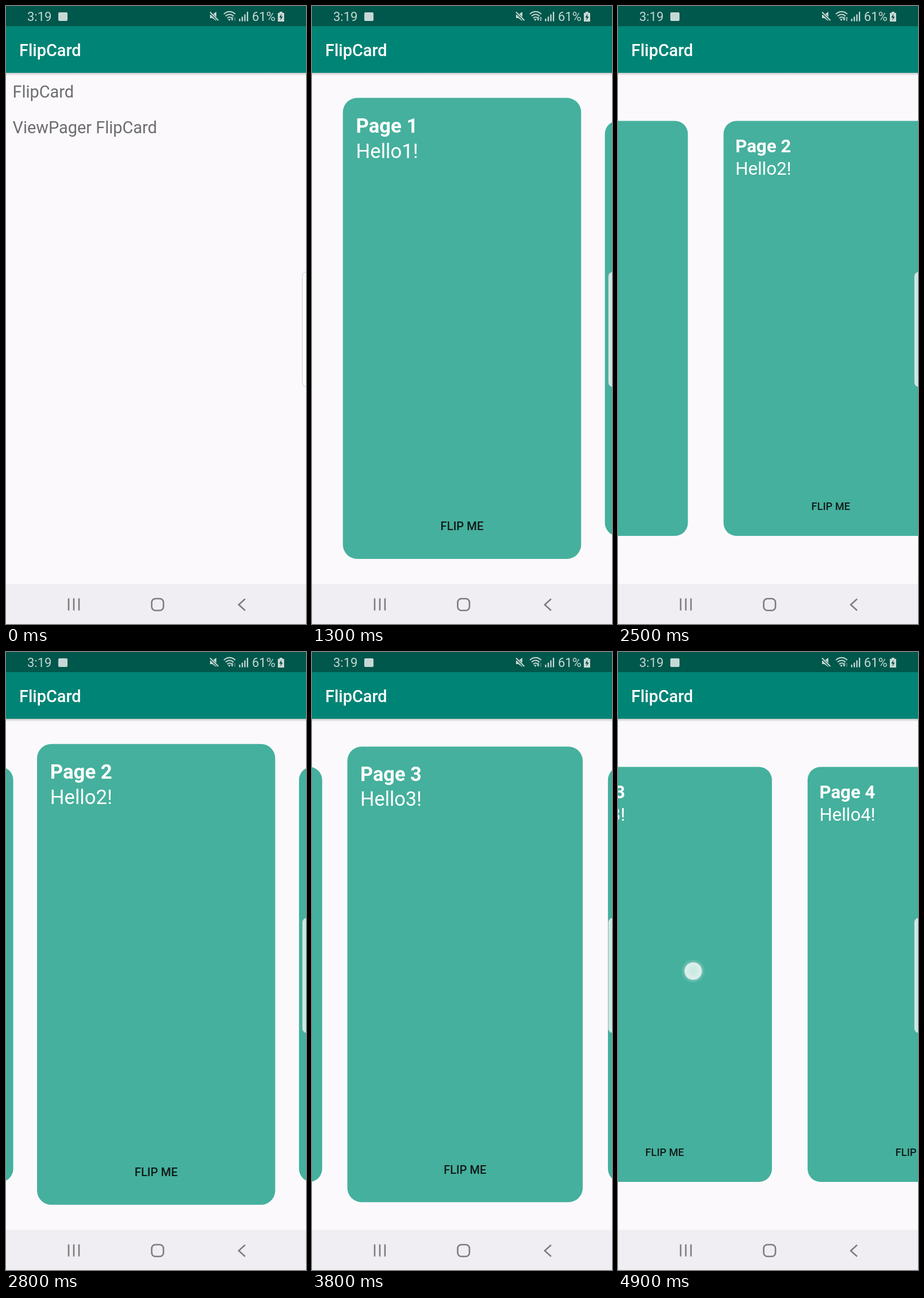
An HTML page for the animation above (5000 ms loop, 522 px wide and 1073 px high).

```html
<!DOCTYPE html>
<html lang="en">
<head>
<meta charset="utf-8">
<title>FlipCard</title>
<style>
  html, body { margin: 0; width: 100%; height: 100%; overflow: hidden; background: #fbf9fc; }
  svg { display: block; width: 100%; height: 100%; }
  text { font-family: Roboto, "Noto Sans", sans-serif; }
  .title { font-size: 28.9px; font-weight: 500; fill: #fff; }
  .item { font-size: 28.9px; fill: #6d6c6e; }
  .page { font-size: 34.7px; font-weight: 700; fill: #fff; }
  .hello { font-size: 34.7px; fill: #fff; }
  .flip { font-size: 20.2px; font-weight: 500; fill: #101a18; text-anchor: middle; }
  .clock { font-size: 22px; fill: #c6d8d5; }
</style>
</head>
<body>
<svg viewBox="0 0 522 1073" preserveAspectRatio="none">
  <defs>
    <linearGradient id="shade" x2="0" y2="1">
      <stop offset="0" stop-color="#000" stop-opacity=".2"/>
      <stop offset="1" stop-color="#000" stop-opacity="0"/>
    </linearGradient>
    <radialGradient id="glow">
      <stop offset=".7" stop-color="#fff" stop-opacity=".28"/>
      <stop offset="1" stop-color="#fff" stop-opacity="0"/>
    </radialGradient>
    <radialGradient id="dot">
      <stop offset="0" stop-color="#fff" stop-opacity=".58"/>
      <stop offset="1" stop-color="#fff" stop-opacity=".76"/>
    </radialGradient>
    <g id="bars">
      <rect y="116" width="522" height="5" fill="url(#shade)"/>
      <rect width="522" height="36" fill="#00574b"/>
      <rect y="35" width="522" height="81" fill="#008475"/>
      <text class="title" x="23" y="87">FlipCard</text>
      <rect y="1003.5" width="522" height="70" fill="#f0eef2"/>
    </g>
  </defs>

  <g id="list">
    <rect width="522" height="1080" fill="#fbf9fc"/>
    <text class="item" x="11.5" y="158.5">FlipCard</text>
    <text class="item" x="11.5" y="221">ViewPager FlipCard</text>
    <use href="#bars"/>
  </g>
  <rect id="dim" width="522" height="1073"/>

  <g id="pager">
    <rect width="522" height="1073" fill="#fbf9fc"/>
    <g id="cards"></g>
    <use href="#bars"/>
  </g>

  <rect x="515.5" y="461.5" width="30" height="200" rx="8" fill="#fff" fill-opacity=".72"
        stroke="#96a3a0" stroke-opacity=".55"/>

  <g fill="none" stroke="#000" stroke-opacity=".48" stroke-width="2.6">
    <path d="M109 1028.5v21M118 1028.5v21M127 1028.5v21"/>
    <rect x="253.5" y="1029" width="20.5" height="20.5" rx="6.5"/>
    <path d="M416 1029.5L405 1039.5L416 1049.5"/>
  </g>

  <g fill="#c6d8d5">
    <text class="clock" x="37" y="26">3:19</text>
    <rect x="91" y="11" width="16" height="15" rx="2"/>
    <path d="M355 15h4l7-5v16l-7-5h-4z"/>
    <path d="M354 10l16 16" stroke="#00574b" stroke-width="4"/>
    <path d="M355 10.500l14.500 14.500" stroke="#c6d8d5" stroke-width="2"/>
    <g fill="none" stroke="#c6d8d5" stroke-width="1.8">
      <path d="M379 14q10-8.500 20 0M382 17.500q7-6 14 0M385 21q4-3.400 8 0"/>
    </g>
    <path d="M386 22.500h5l-2.500 3.500z"/>
    <path d="M391.500 22h4l-2 4zM393 18.500h1.500v4h-1.500z"/>
    <path id="upload" d="M396 22h4l-2-3.500zM397.300 21h1.500v5h-1.500z"/>
    <path d="M405.500 22h2.300v4.500h-2.300zM410 18.500h2.300v8h-2.300zM414.500 14.500h2.300v12h-2.300zM419 10h2.300v16.500h-2.300z"/>
    <text class="clock" x="428" y="26">61%</text>
    <path d="M476 10h5v2h3v15h-11v-15h3z"/>
    <path d="M479.500 13.500l-4 6.500h2.700l-1 5 4.400-6.500h-2.800z" fill="#00473d"/>
  </g>

  <g id="touch">
    <circle r="21" fill="url(#glow)"/>
    <circle r="15.500" fill="url(#dot)" stroke="#4a8f88" stroke-opacity=".4"/>
  </g>
</svg>

<script>
const LOOP = 5000, STEP = 100, SPACING = 435.2;
const CENTER = { x: 261, y: 559.75 };
const $ = id => document.getElementById(id);
const clamp = (v, lo, hi) => Math.min(hi, Math.max(lo, v));

// Each swipe drags by `pull` pages until release, then settles on the next page.
const swipes = [
  { down: 2200, start: 2200, release: 2420, pull: .4, settle: 500, x: 300, y: 611 },
  { down: 3000, start: 3100, release: 3480, pull: .45, settle: 600, x: 287, y: 607.5 },
  { down: 4500, start: 4500, release: 4910, pull: .4286, settle: 600, x: 310.6, y: 604.3 }
];

$("cards").innerHTML = [1, 2, 3, 4, 5].map(n => `<g>
  <rect x="53.700" y="159.500" width="414.600" height="800.500" rx="25" fill="#45b09d"/>
  <text class="page" x="76.500" y="220">Page ${n}</text>
  <text class="hello" x="76.500" y="263.500">Hello${n}!</text>
  <text class="flip" x="261" y="910">FLIP ME</text></g>`).join("");
const cards = [...$("cards").children];

function swipeProgress(s, t) {
  if (t <= s.start) return 0;
  if (t < s.release) return s.pull * ((t - s.start) / (s.release - s.start)) ** 1.5;
  const left = 1 - clamp((t - s.release) / s.settle, 0, 1);
  return 1 - (1 - s.pull) * left ** 5;
}

function touchAt(t) {
  if (t >= 500 && t < 700) return [150, 211];
  const s = swipes.find(s => t >= s.down && t < s.release);
  if (!s) return null;
  const drag = swipeProgress(s, t) * SPACING;
  return [s.x - drag, s.y - .28 * drag];
}

function drawCards(scroll) {
  cards.forEach((card, i) => {
    const pos = i - scroll, scale = Math.max(.9, 1 - Math.abs(pos));
    const x = CENTER.x + pos * SPACING;
    card.setAttribute("transform",
      `translate(${x} ${CENTER.y}) scale(${scale}) translate(${-CENTER.x} ${-CENTER.y})`);
    card.style.display = Math.abs(pos) < 1.6 ? "" : "none";
  });
}

function drawWindows(t) {
  const slide = t < 700 ? 1073 : t >= 1300 ? 0 : Math.min(1073, 136 * .28 ** ((t - 900) / 100));
  const open = 1 - slide / 1073;
  $("pager").setAttribute("transform", `translate(0 ${slide})`);
  $("list").setAttribute("transform", `translate(0 ${-6.3 * open})`);
  $("dim").setAttribute("opacity", .075 * open);
}

function render(t) {
  drawWindows(t);
  drawCards(swipes.reduce((sum, s) => sum + swipeProgress(s, t), 0));
  const touch = touchAt(t);
  $("touch").style.display = touch ? "" : "none";
  if (touch) $("touch").setAttribute("transform", `translate(${touch})`);
  $("upload").setAttribute("opacity", t >= 1300 && t < 2800 ? 1 : .4);
}

const began = performance.now();
function tick() {
  const t = (performance.now() - began) % LOOP;
  render(Math.floor(t / STEP) * STEP);
  requestAnimationFrame(tick);
}
tick();
</script>
</body>
</html>
```
